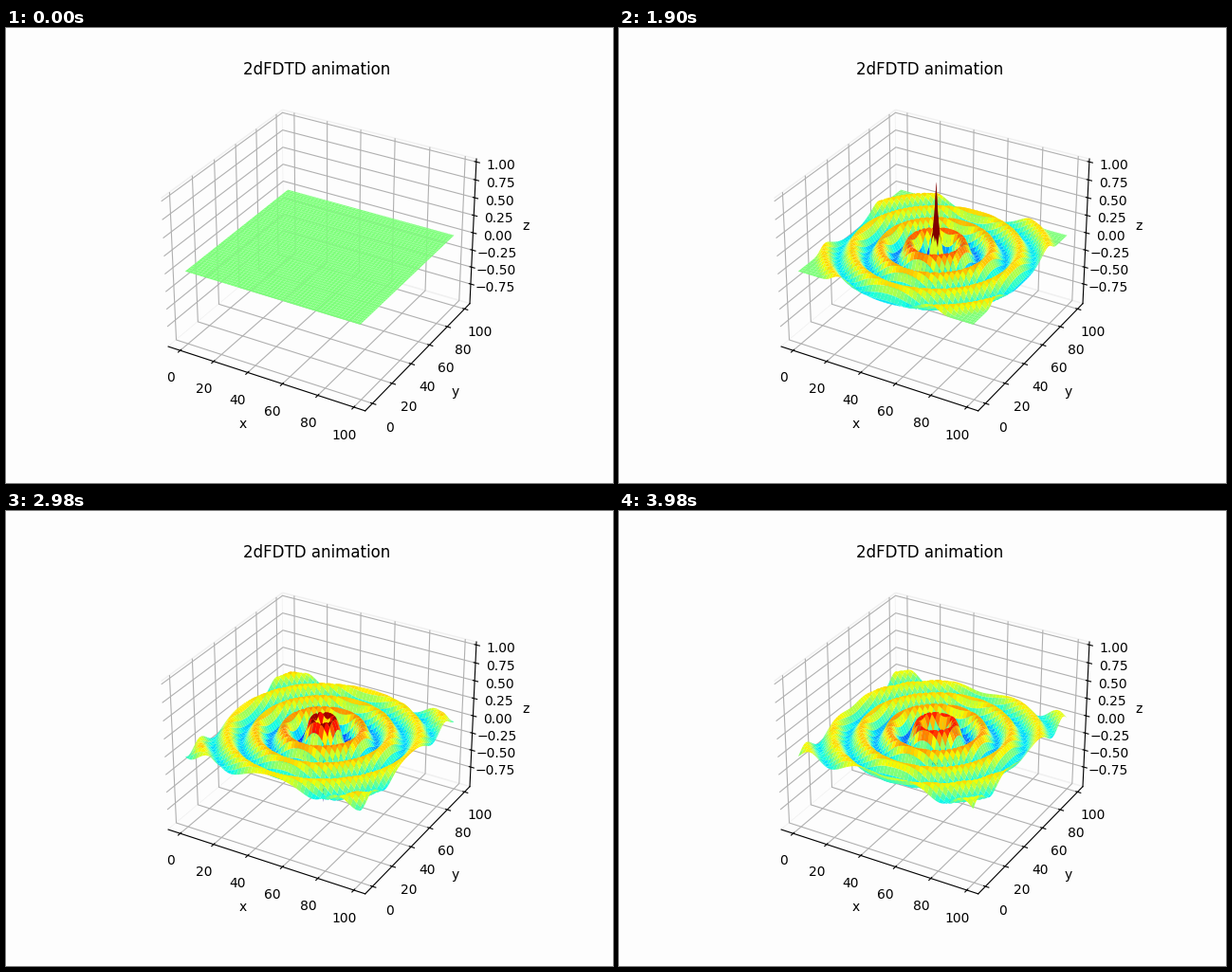
A matplotlib script that plays this animation: 640 by 480 pixels, repeating every 4000 ms.

```python
import itertools

import matplotlib.pyplot as plt
import numpy as np
from matplotlib.animation import FuncAnimation
from mpl_toolkits.mplot3d.art3d import Poly3DCollection

N = 100              # grid points per side
FRAMES = 200
INTERVAL = 20        # ms
COURANT = 0.9 / np.sqrt(2)
FREQ = 0.045         # source cycles per step
MID = N // 2
STRIDE = 2
PAPER = "#fdfdfd"


def absorb(new, old, k):
    """First-order Mur boundary on all four sides."""
    for a, b in ((0, 1), (-1, -2)):
        new[a, :] = old[b, :] + k * (new[b, :] - old[a, :])
    for a, b in ((0, 1), (-1, -2)):
        new[:, a] = old[:, b] + k * (new[:, b] - old[:, a])


def simulate():
    """Field at every step, driven by a hard sine source in the middle."""
    k = (COURANT - 1) / (COURANT + 1)
    prev = np.zeros((N, N))
    cur = np.zeros((N, N))
    fields = [cur]
    for step in range(1, FRAMES):
        new = np.zeros((N, N))
        c = cur[1:-1, 1:-1]
        lap = (cur[2:, 1:-1] + cur[:-2, 1:-1]
               + cur[1:-1, 2:] + cur[1:-1, :-2] - 4 * c)
        new[1:-1, 1:-1] = 2 * c - prev[1:-1, 1:-1] + COURANT**2 * lap
        new[MID, MID] = np.sin(2 * np.pi * FREQ * step)
        absorb(new, cur, k)
        prev, cur = cur, new
        fields.append(cur)
    return fields


def perimeter(r0, r1, c0, c1):
    """Flat indices around the border of one patch."""
    ring = [(r0, c) for c in range(c0, c1)]
    ring += [(r, c1) for r in range(r0, r1)]
    ring += [(r1, c) for c in range(c1, c0, -1)]
    ring += [(r, c0) for r in range(r1, r0, -1)]
    return [r * N + c for r, c in ring]


lines = list(range(0, N - 1, STRIDE)) + [N - 1]
spans = list(itertools.pairwise(lines))
patches = [perimeter(*r, *c) for r in spans for c in spans]
counts = np.array([len(p) for p in patches])
starts = np.concatenate(([0], np.cumsum(counts)[:-1]))
order = np.concatenate(patches)
cols, rows = np.meshgrid(np.arange(N), np.arange(N))
fields = simulate()


def patch_verts(field):
    pts = np.column_stack((cols.ravel(), rows.ravel(), field.ravel()))[order]
    verts = [pts[s:s + n] for s, n in zip(starts, counts)]
    return verts, np.add.reduceat(pts[:, 2], starts) / counts


fig = plt.figure(figsize=(6.4, 4.8), dpi=100, facecolor=PAPER)
ax = fig.add_subplot(projection="3d", facecolor=PAPER)
ax.set_title("2dFDTD animation")
ax.set(xlabel="x", ylabel="y", zlabel="z")
ax.set_zticks(np.arange(-0.75, 1.01, 0.25))
for axis in (ax.xaxis, ax.yaxis, ax.zaxis):
    axis.pane.set(facecolor=PAPER, edgecolor="#f0f0f0", alpha=1)

verts, heights = patch_verts(fields[0])
surface = Poly3DCollection(verts, cmap="jet")
surface.set_array(heights)
surface.set_clim(-0.25, 0.25)
ax.add_collection3d(surface)

# 5% margin around the grid, then a 1/48 border on every axis
half = (N - 1) / 2
reach = half * 1.1 * 25 / 24
ax.set_xlim(half - reach, half + reach)
ax.set_ylim(half - reach, half + reach)
ax.set_zlim(-25 / 24, 25 / 24)


def update(i):
    verts, heights = patch_verts(fields[i])
    surface.set_verts(verts)
    surface.set_array(heights)
    return [surface]


anim = FuncAnimation(fig, update, frames=FRAMES, interval=INTERVAL,
                     repeat=True, repeat_delay=0, blit=False)
plt.show()
```
